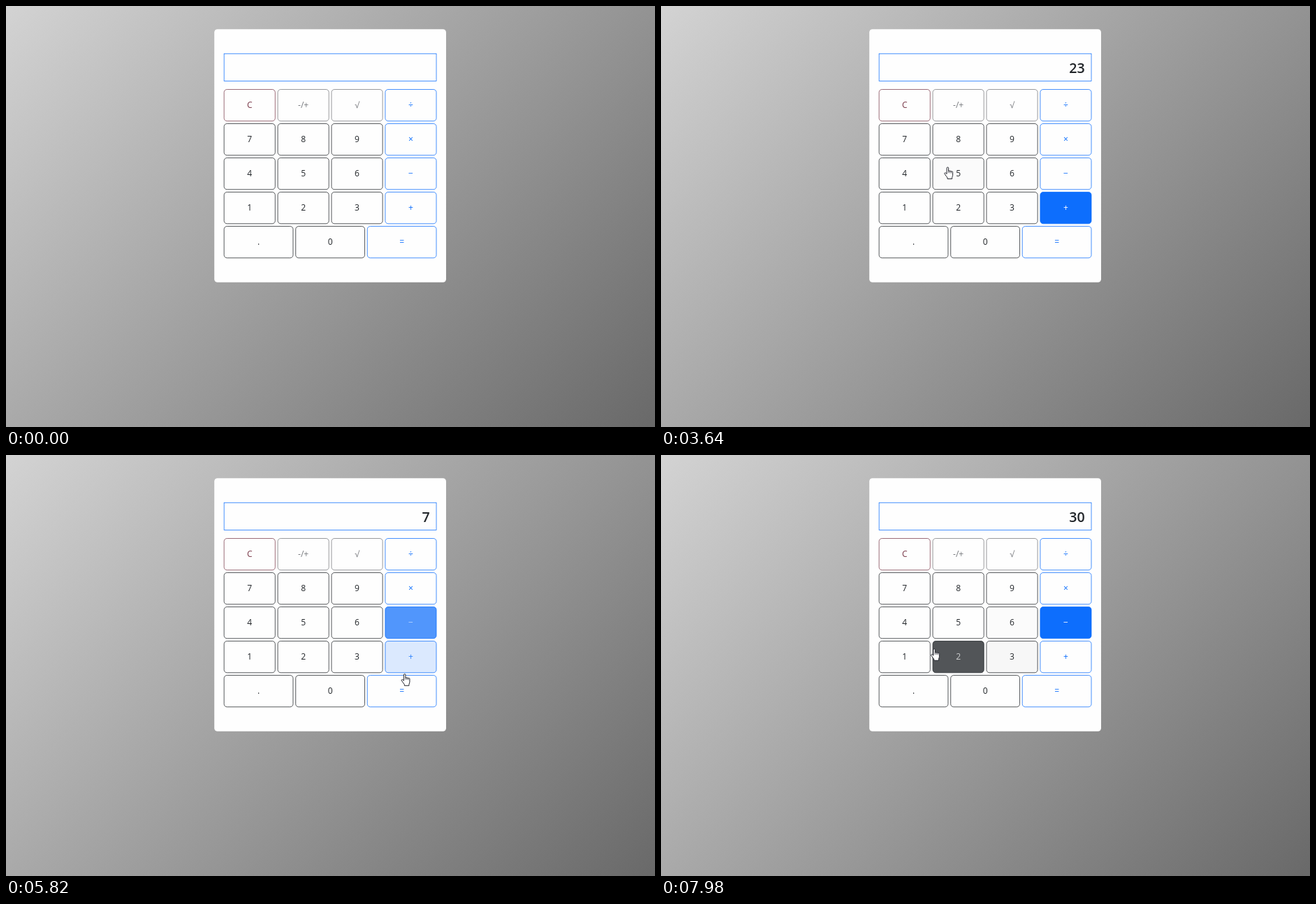
An HTML page that plays this animation: 929 px wide and 603 px high, repeating every 8000 ms.

```html
<!DOCTYPE html>
<html lang="en">
<head>
<meta charset="utf-8">
<title>Calculator</title>
<style>
  html, body { margin: 0; width: 100%; height: 100%; overflow: hidden; }
  body { position: relative; background: linear-gradient(135deg, #d3d3d3, #696969); }
  .card, .screen, .key, .hand { position: absolute; box-sizing: border-box; }
  .card {
    left: 0; top: 0; width: 440px; height: 481px; border-radius: 6px; background: #fefefe;
    transform: translate(298.2px, 33.2px) scale(.754); transform-origin: 0 0;
    font: 16px "Open Sans", "Noto Sans", sans-serif;
  }
  .screen {
    left: 18px; top: 46px; width: 404px; height: 53px; padding-right: 12px;
    border: 1px solid #0d6efd; color: #212529;
    font-size: 26px; font-weight: 600; line-height: 52px; text-align: right;
  }
  .key { border: 1px solid; border-radius: 6px; line-height: 59px; text-align: center; }
  .hand { left: 0; top: 0; overflow: visible; }
</style>
</head>
<body>
<div class="card"><div class="screen"></div></div>
<svg class="hand" width="14" height="18" viewBox="0 0 14 18">
  <path fill="#fff" stroke="#24262e" stroke-linejoin="round" d="M3.9 10.2V1.9a1.25 1.25 0 0 1 2.5 0v4.6a1 1 0 0 1 2 .3a1 1 0 0 1 2 .5a1 1 0 0 1 2 .7v4.2c0 1.5-1 2.2-1 3.2v1.9h-6.6v-1.6c-.9-1.6-2.7-3.4-4-5.6c-.6-1.3.9-2 1.7-1.2z"/>
  <path fill="none" stroke="#24262e" stroke-width=".7" d="M6.4 6.5v2.4M8.4 6.8v2.2M10.4 7.3v2"/>
</svg>
<script>
const LOOP = 8000, FADE = 150, LAG = 30, ENTER = 200;
const SCALE = .754, LEFT = 298.2, TOP = 33.2;
const dark = [33, 37, 41], blue = [13, 110, 253], gray = [120, 122, 126], wine = [124, 60, 76];
const card = document.querySelector('.card');
const screen = document.querySelector('.screen');
const hand = document.querySelector('.hand');

// Pointer strokes: each lists its time, x, y at the key points; it rests in between
const path = [
  [ENTER, 860, 597], [600, 508, 364], [980, 428, 284],
  [1460, 428, 284], [1710, 459, 287], [1850, 498, 285], [2000, 500, 275],
  [2590, 500, 275], [2800, 566, 307], [2970, 579, 296],
  [3200, 579, 296], [3480, 535, 265], [3602, 461, 265], [3640, 405.5, 230.5], [3970, 345, 192],
  [4560, 345, 192], [4955, 381.5, 213], [5100, 443, 242], [5280, 450, 243],
  [5620, 536, 243], [5768, 562, 265], [5820, 565.5, 313], [6080, 560, 316],
  [6340, 560, 316], [6410, 562, 315.5], [6450, 568.5, 301], [6900, 571, 240],
  [7350, 571, 240], [7640, 540, 247], [7830, 484, 264], [7980, 386, 277]
];

const presses = [[1440, '2'], [2180, '3'], [2970, '+'], [4490, '7'], [6190, '='], [7100, '−']];

// Cubic ease with control points (.25,.1) and (.25,1)
function ease(p) {
  if (p <= 0) return 0;
  if (p >= 1) return 1;
  let lo = 0, hi = 1;
  for (let i = 0; i < 16; i++) {
    const s = (lo + hi) / 2;
    if (.75 * s * (1 - s) + s ** 3 < p) lo = s; else hi = s;
  }
  const q = 1 - lo;
  return .3 * q * q * lo + 3 * q * lo * lo + lo ** 3;
}

// Monotone cubic through the key points
function slope(i, k) {
  const rate = j => (path[j + 1][k] - path[j][k]) / (path[j + 1][0] - path[j][0]);
  if (i === 0) return rate(0);
  if (i === path.length - 1) return rate(i - 1);
  const a = rate(i - 1), b = rate(i);
  return a * b <= 0 ? 0 : 2 * a * b / (a + b);
}

function along(t, k) {
  const i = path.findIndex(p => p[0] > t) - 1;
  if (i < 0) return path[t < ENTER ? 0 : path.length - 1][k];
  const a = path[i], b = path[i + 1], d = b[0] - a[0], u = (t - a[0]) / d, v = 1 - u;
  return a[k] * (1 + 2 * u) * v * v + b[k] * u * u * (3 - 2 * u)
    + d * u * v * (slope(i, k) * v - slope(i + 1, k) * u);
}

const keys = [];
['C ± √ ÷', '7 8 9 ×', '4 5 6 −', '1 2 3 +', '. 0 ='].forEach((row, r) => {
  const names = row.split(' ');
  const w = (404 - 4 * (names.length - 1)) / names.length, h = 61;
  names.forEach((name, c) => {
    const x = 18 + c * (w + 4), y = 114 + r * (h + 4);
    const el = document.createElement('div');
    const tone = name === 'C' ? wine : '±√'.includes(name) ? gray : '÷×−+='.includes(name) ? blue : dark;
    el.className = 'key';
    el.textContent = name === '±' ? '-/+' : name;
    Object.assign(el.style, {
      left: x + 'px', top: y + 'px', width: w + 'px', height: h + 'px', borderColor: `rgb(${tone})`
    });
    card.append(el);
    keys.push({ el, name, tone, x, y, w, h, hovers: [], held: [] });
  });
});

// Walk the pointer once to find when it is over each key
let over = null;
for (let t = ENTER; t < LOOP; t += 2) {
  const px = (along(t, 1) + 5 - LEFT) / SCALE, py = (along(t, 2) - TOP) / SCALE;
  const hit = keys.find(k => px >= k.x && px <= k.x + k.w && py >= k.y && py <= k.y + k.h);
  if (hit === over) continue;
  if (over) over.hovers.at(-1)[1] = t + LAG;
  if (hit) hit.hovers.push([t + LAG, Infinity]);
  over = hit;
}

// Work through the presses: an operator stays lit until the next press
const readout = [[0, '']];
let entry = '', sum = 0;
presses.forEach(([t, name], i) => {
  if ('+−'.includes(name)) {
    const end = presses[i + 1] ? presses[i + 1][0] : Infinity;
    keys.find(k => k.name === name).held.push([t, end]);
    sum = +entry;
    entry = '';
  } else {
    entry = name === '=' ? String(sum + +entry) : entry + name;
    readout.push([t, entry]);
  }
});

function level(spans, t) {
  return Math.max(0, ...spans.map(([a, b]) =>
    ease((Math.min(t, b) - a) / FADE) * (1 - ease((t - b) / FADE))));
}

// A released operator keeps its white label until it is hovered again
function faded({ held, hovers }, t) {
  return held.some(([, end]) => t >= end && !hovers.some(([a]) => a > end && a <= t));
}

function draw() {
  const t = performance.now() % LOOP;
  for (const key of keys) {
    const f = Math.max(level(key.hovers, t), level(key.held, t));
    const white = faded(key, t) ? 1 : f;
    const ink = key.tone.map(v => Math.round(v + (255 - v) * white));
    key.el.style.backgroundColor = `rgba(${key.tone},${f.toFixed(3)})`;
    key.el.style.color = `rgb(${ink})`;
  }
  const text = readout.filter(r => r[0] <= t).pop()[1];
  if (screen.textContent !== text) screen.textContent = text;
  hand.style.visibility = t < ENTER ? 'hidden' : 'visible';
  hand.style.transform = `translate(${along(t, 1).toFixed(1)}px,${along(t, 2).toFixed(1)}px)`;
  requestAnimationFrame(draw);
}
draw();
</script>
</body>
</html>
```
